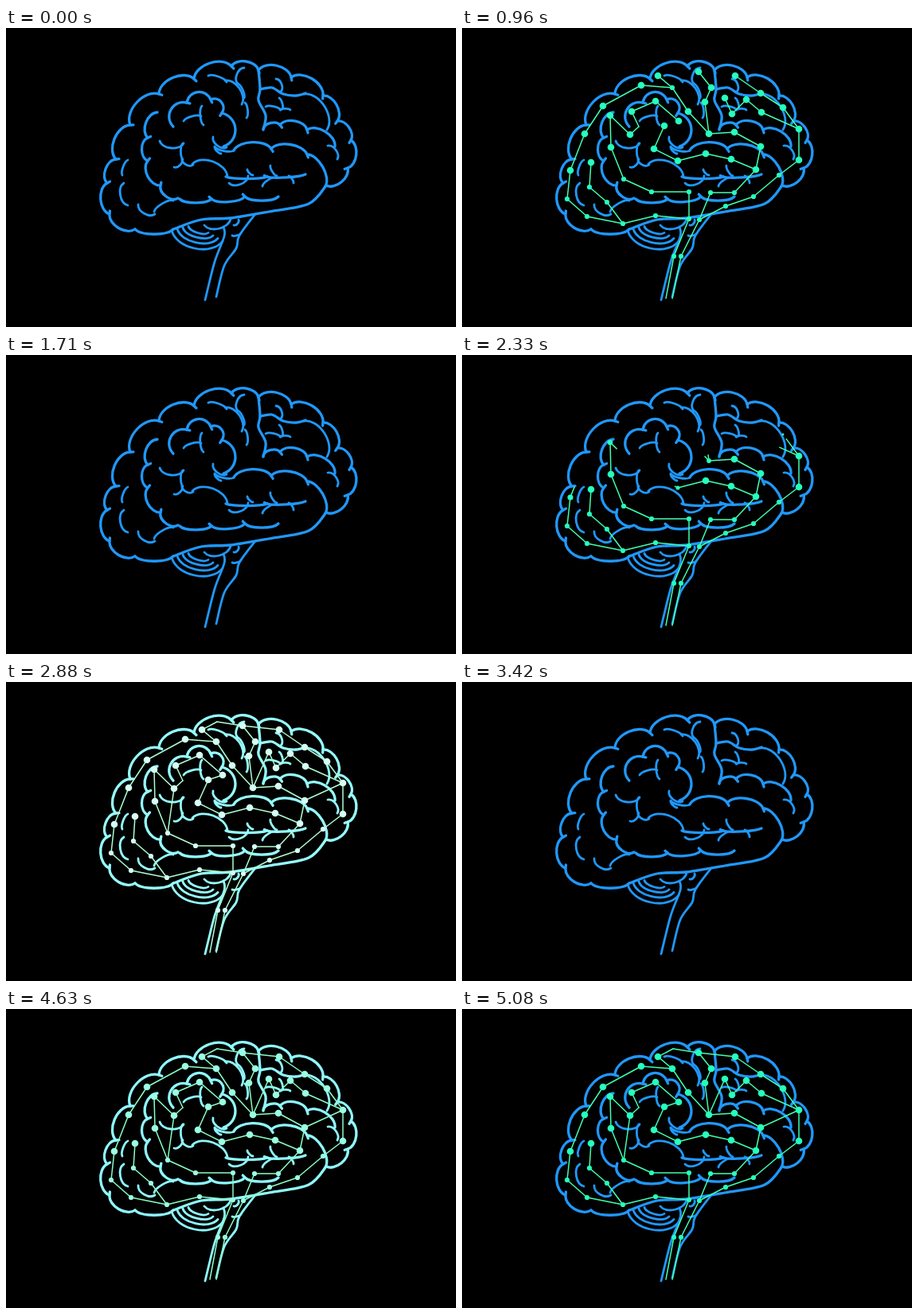
Recreate the animation shown at these times as an HTML page. Size 565 by 376 pixels, loop 5120 ms.

```html
<!DOCTYPE html>
<html lang="en">
<head>
<meta charset="utf-8">
<title>Brain network</title>
<style>
  html, body { margin: 0; width: 100%; height: 100%; overflow: hidden; background: #000; }
  svg { display: block; width: 100vw; height: 100vh; }
</style>
</head>
<body>
<svg viewBox="0 0 565 376">
  <g id="brain" fill="none" stroke-linecap="round" stroke-linejoin="round"></g>
  <g id="links" stroke-width="1.5" stroke-linecap="round"></g>
  <g id="dots"></g>
</svg>
<script>
const LOOP = 5120, CYCLE = 1710;
const SPEED = 0.53;                       // growth in pixels per ms
const CROSS_START = 965, CROSS_SPAN = 110; // closing links

const brain = document.getElementById('brain');
const links = document.getElementById('links');
const dots = document.getElementById('dots');

const parse = text => text.split(' ').map(p => p.split(',').map(Number));
const clamp = v => Math.max(0, Math.min(1, v));
const ramp = (t, from, to) => clamp((t - from) / (to - from));
const mix = (a, b, k) => `rgb(${a.map((v, i) => Math.round(v + (b[i] - v) * k))})`;

function add(parent, tag, attrs) {
  const el = document.createElementNS('http://www.w3.org/2000/svg', tag);
  for (const key in attrs) el.setAttribute(key, attrs[key]);
  return parent.appendChild(el);
}
const ink = (d, width) => add(brain, 'path', { d, 'stroke-width': width });

// One arc from a to b, bowed to the left of travel; the tail runs on past b.
function arc(a, b, bulge, width, tail = 0) {
  const [dx, dy] = [b[0] - a[0], b[1] - a[1]];
  const nx = dy * bulge * 4 / 3, ny = -dx * bulge * 4 / 3;
  const c1 = [a[0] + nx + dx * 0.15, a[1] + ny + dy * 0.15];
  const c2 = [b[0] + nx - dx * 0.15, b[1] + ny - dy * 0.15];
  const k = tail / Math.hypot(b[0] - c2[0], b[1] - c2[1]);
  ink(`M${a}C${c1} ${c2} ${b}l${(b[0] - c2[0]) * k},${(b[1] - c2[1]) * k}`, width);
}

// A row of bumps meeting in cusps.
function scallop(bulge, text) {
  const cusps = parse(text);
  for (let i = 1; i < cusps.length; i++)
    arc(cusps[i - 1], cusps[i], bulge, 3.3, i < cusps.length - 1 ? 4 : 0);
}

// Short single folds sharing one bow.
function folds(bulge, ...texts) {
  for (const text of texts) arc(...parse(text), bulge, 2.8);
}

// Smooth line through a few points.
function smooth(text, width = 3.3) {
  const p = parse(text);
  let d = 'M' + p[0];
  for (let i = 0; i < p.length - 1; i++) {
    const a = p[i - 1] || p[i], b = p[i], c = p[i + 1], e = p[i + 2] || c;
    d += `C${b.map((v, k) => v + (c[k] - a[k]) / 6)} ${c.map((v, k) => v - (e[k] - b[k]) / 6)} ${c}`;
  }
  ink(d, width);
}

function drawBrain() {
  scallop(0.13, '210,253 162,253');
  scallop(0.25, '162,253 130,234 127,195 138,165 156,122 192,83 236,64 283,48 317,53 '
    + '358,62 398,85 416,117 433,141 429,176 402,198');
  smooth('210,253 245,241 282,239 330,231 380,221 402,198');

  scallop(0.26, '216,214 194,198 178,167 178,138 190,106');
  scallop(0.38, '210,124 227,94 257,90 271,107 273,149');
  scallop(0.2, '286,154 333,152 378,159 401,199');
  scallop(0.24, '323,127 344,122 378,128 413,149');
  scallop(0.12, '342,212 300,212 258,215 218,215');
  scallop(0.05, '376,184 328,187 276,187');
  smooth('317,53 319,77 317,91 326,110 323,128');
  smooth('319,77 334,75 348,83 364,85 376,82');

  folds(0.25, '374,83 403,128', '404,148 416,165', '339,64 345,80', '275,66 296,96', '221,165 211,175');
  folds(0.13, '254,60 277,68', '291,70 299,88', '300,94 302,113', '326,99 345,103', '344,103 357,103',
    '343,88 347,102', '186,231 210,217', '223,117 245,111', '322,199 338,188', '355,186 361,195');
  folds(-0.13, '153,166 146,185', '222,145 222,165', '246,98 248,122', '332,173 340,186',
    '303,178 310,185', '262,149 286,154', '262,150 270,158', '284,261 295,258');
  folds(-0.25, '278,187 234,171', '299,50 291,70', '148,195 153,223', '166,222 187,234', '193,142 223,145',
    '221,165 235,172', '260,137 277,150', '280,195 304,186', '249,248 282,240', '286,248 292,241');

  // Nested cerebellum ridges
  for (let i = 0; i < 4; i++)
    arc([208 + 7 * i, 254 - 1.5 * i], [272 - 6 * i, 268 - 3.5 * i], 0.03 * i - 0.25, 2.8);

  smooth('273,250 274,262 262,294 250,342', 2.8);
  smooth('313,234 293,261 289,277 274,299 264,338', 2.8);
}

// Chains branch from points already reached; a trailing 0 marks a bare bend.
const chains = [
  '256,340 266,287 285,240 243,236 202,246 157,237 132,215 136,179 154,133 177,98 225,72 264,75',
  '285,240 285,206 238,206 203,190 187,150 186,110 211,134 222,124,0 213,105 243,92 272,117',
  '202,246 182,219 160,200 162,169',
  '264,340 275,287 298,241 331,224 366,212 398,185 423,166 423,127 403,100 375,82 343,60',
  '423,127 376,106 357,90 339,108 330,88',
  '298,241 312,207 342,207 369,178 338,165 306,158 271,167 241,152 254,123',
  '369,178 375,149 342,131 310,133 284,105 264,75 246,60',
  '310,133 305,93 313,75 297,55'
];
const crossLinks = [
  '246,60 265,50 297,55', '343,60 297,55', '211,134 203,190',
  '375,149 423,127', '330,88 310,133', '272,117 254,123'
];

const edges = [], nodes = [], reached = new Map();

function addEdge(a, b, start, end) {
  edges.push({ el: add(links, 'line', { x1: a[0], y1: a[1] }), a, b, start, end });
}

function addNode([x, y], time) {
  const r = y > 182 ? 3.1 : 4.3;
  nodes.push({ el: add(dots, 'circle', { cx: x, cy: y }), r, start: time - 40 });
}

function buildNetwork() {
  for (const text of chains) {
    const stops = parse(text);
    let time = reached.get(String(stops[0])) ?? 20;
    for (let i = 1; i < stops.length; i++) {
      const a = stops[i - 1], b = stops[i], key = String(b);
      const end = time + Math.hypot(b[0] - a[0], b[1] - a[1]) / SPEED;
      addEdge(a, b, time, end);
      if (b.length === 2 && !reached.has(key)) {
        addNode(b, end);
        reached.set(key, end);
      }
      time = end;
    }
  }
  for (const text of crossLinks) {
    const stops = parse(text), span = CROSS_SPAN / (stops.length - 1);
    for (let i = 1; i < stops.length; i++)
      addEdge(stops[i - 1], stops[i], CROSS_START + (i - 1) * span, CROSS_START + i * span);
  }
}

function render(t) {
  const phase = (t % LOOP) % CYCLE;
  const rise = ramp(phase, 1085, 1165);
  const brainFlash = rise * (1 - ramp(phase, 1190, 1540));
  const netFlash = rise * (1 - ramp(phase, 1170, 1290));

  brain.setAttribute('stroke', mix([32, 152, 252], [150, 255, 255], brainFlash));
  links.setAttribute('stroke', mix([64, 255, 176], [176, 255, 208], netFlash));
  dots.setAttribute('fill', mix([38, 255, 190], [214, 255, 244], netFlash));

  for (const { el, a, b, start, end } of edges) {
    const k = ramp(phase, start, end);
    el.setAttribute('x2', a[0] + (b[0] - a[0]) * k);
    el.setAttribute('y2', a[1] + (b[1] - a[1]) * k);
    el.setAttribute('visibility', k > 0 ? 'visible' : 'hidden');
  }
  for (const { el, r, start } of nodes)
    el.setAttribute('r', r * ramp(phase, start, start + 80));
}

drawBrain();
buildNetwork();

const begin = performance.now();
function frame() {
  render(performance.now() - begin);
  requestAnimationFrame(frame);
}
render(0);
requestAnimationFrame(frame);
</script>
</body>
</html>
```
